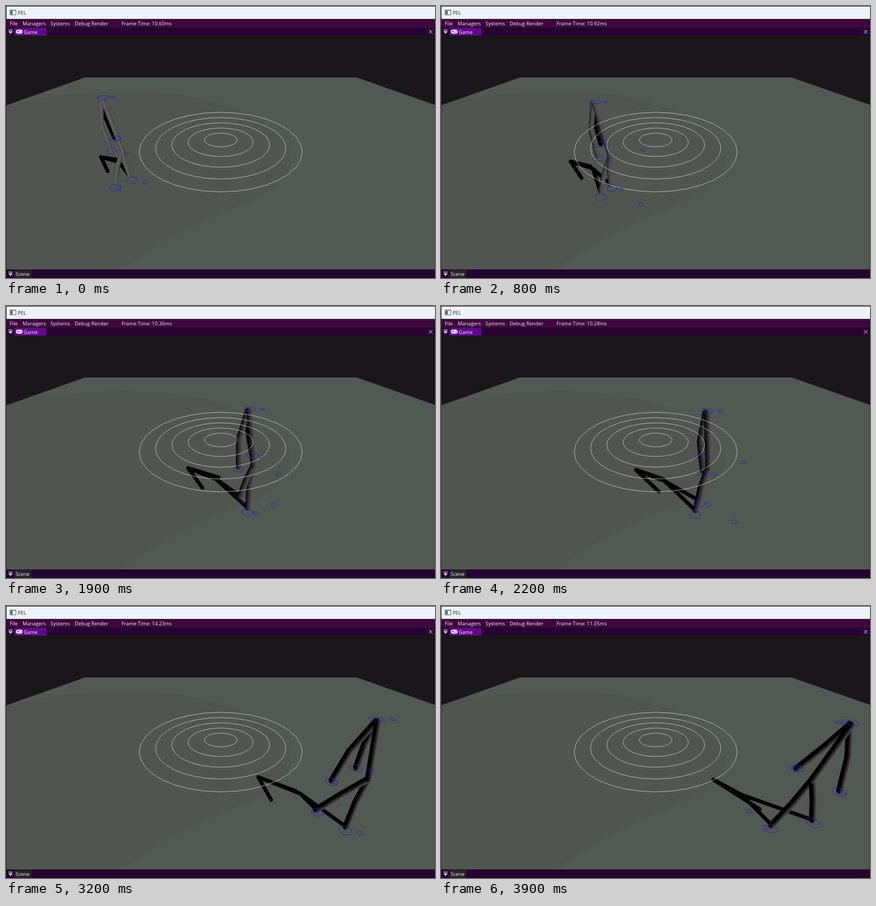
Recreate the animation shown at these times as an HTML page with a canvas. Size 800 by 506 pixels, loop 4000 ms.

```html
<!DOCTYPE html>
<html lang="en">
<head>
<meta charset="utf-8">
<style>
  html, body { margin: 0; width: 100%; height: 100%; overflow: hidden; background: #1a171b; }
  canvas { display: block; }
</style>
</head>
<body>
<canvas id="stage" width="800" height="506"></canvas>
<script>
const ctx = document.getElementById('stage').getContext('2d');
const LOOP = 4000, TICK = 100;
const STRIDE_MS = 695, FOOT_EASE = 236, REACH = 70, LOOK_AHEAD = 600;

// Body path: time, x of the upper end, x of the lower end.
const PATH = [
  [0, 181, 217], [800, 287, 315], [1500, 398, 412], [2200, 496, 497],
  [2600, 566, 561], [3200, 692, 674], [3700, 777, 708], [3900, 764, 690]
];
const UPPER = 1, LOWER = 2;

// phase: first step time; row: screen y at x = 200; side/drift: rest place relative to the body.
const LEGS = [
  { joint: UPPER, phase: 75, row: 246, side: 33, drift: 0.095, bend: -3, ankle: [-1, -2], dark: true },
  { joint: UPPER, phase: 430, row: 270.5, side: 7, drift: 0.04, bend: -8, ankle: [-1, -4] },
  { joint: LOWER, phase: 75, row: 337, side: -4, drift: 0.04, bend: -3, ankle: [0, -8] },
  { joint: LOWER, phase: 424, row: 318, side: 2, drift: 0.1, bend: -2, ankle: [-3, -6] }
];

const mix = (a, b, k) => a + (b - a) * k;
const clamp = (v, lo, hi) => Math.max(lo, Math.min(hi, v));
const gray = v => `rgb(${v},${v},${v})`;

// Continues the first and last stretch beyond the ends of the path.
function bodyX(t, end) {
  let i = 0;
  while (i < PATH.length - 2 && t > PATH[i + 1][0]) i++;
  const a = PATH[i], b = PATH[i + 1];
  return mix(a[end], b[end], (t - a[0]) / (b[0] - a[0]));
}

const onRow = (x, row) => [x, row + (x - 200) * (row * 0.0007 - 0.05)];
const castShadow = (x, dx, row) => [x * 0.74 + dx, row + (x * 0.74 + dx - 200) * 0.175];

function foothold(leg, t) {
  const x = bodyX(t, leg.joint);
  const heading = Math.sign(bodyX(t + LOOK_AHEAD, UPPER) - bodyX(t, UPPER));
  return x + heading * REACH + leg.side - (x - PATH[0][leg.joint]) * leg.drift;
}

// A new foothold every stride; the foot eases towards the latest one.
function walk(leg, t) {
  let step = leg.phase - 2 * STRIDE_MS;
  let target = foothold(leg, step), x = target;
  for (step += STRIDE_MS; step <= t; step += STRIDE_MS) {
    target = foothold(leg, step);
    const moving = Math.min(t - step, STRIDE_MS);
    x = mix(target, x, Math.exp(-moving / FOOT_EASE));
  }
  return { foot: onRow(x, leg.row), target: onRow(target, leg.row) };
}

function rect(color, x, y, w, h) {
  ctx.fillStyle = color;
  ctx.fillRect(x, y, w, h);
}

function polygon(color, ...points) {
  ctx.fillStyle = color;
  ctx.beginPath();
  points.forEach(p => ctx.lineTo(...p));
  ctx.fill();
}

function polyline(color, width, ...points) {
  ctx.strokeStyle = color;
  ctx.lineWidth = width;
  ctx.beginPath();
  points.forEach(p => ctx.lineTo(...p));
  ctx.stroke();
}

function text(str, x, y, size = 9.4, color = '#f4eef5') {
  ctx.font = `${size}px "Open Sans", "Noto Sans", sans-serif`;
  ctx.fillStyle = color;
  ctx.fillText(str, x, y);
}

// Floor-plane circle as the tilted camera sees it.
function marker([x, y], scale = 1) {
  const dx = x - 400;
  const rx = 9 + (dx > 0 ? dx * 0.016 : -dx * 0.006);
  const ry = 3 + (y - 170) * 0.02;
  ctx.strokeStyle = '#2a1fc0';
  ctx.lineWidth = 0.9;
  ctx.beginPath();
  ctx.ellipse(x, y, rx * scale, ry * scale, dx * (y - 130) * 5.5e-6, 0, 7);
  ctx.stroke();
}

// Cylinder: lit on the left, then only a black edge fading into the floor (u = distance walked).
function limb(a, b, u, dark) {
  const dx = b[0] - a[0], dy = b[1] - a[1], len = Math.hypot(dx, dy) || 1;
  const nx = dy / len, ny = -dx / len;
  const width = 9 + Math.max(0, u) * 0.007, shift = (width - 9) / 2;
  const at = k => [(a[0] + b[0]) / 2 + nx * k, (a[1] + b[1]) / 2 + ny * k];
  const fill = ctx.createLinearGradient(...at(shift - width / 2), ...at(shift + width / 2));
  fill.addColorStop(0, gray(dark ? 0 : Math.max(0, 70 - u * 0.4)));
  fill.addColorStop(0.42, gray(dark ? 0 : Math.max(0, 98 - u * 0.21)));
  fill.addColorStop(1, gray(Math.min(82, (dark ? 20 : 68) + u * 0.12)));
  const move = p => [p[0] + nx * shift, p[1] + ny * shift];
  polyline(fill, width, move(a), move(b));
}

function drawFloor() {
  rect('#1a171b', 0, 55, 800, 435);
  polygon('#525852', [0, 185], [147, 133], [654, 133], [800, 184], [800, 490], [0, 490]);
  ctx.fillStyle = '#50564f';
  ctx.beginPath();
  ctx.moveTo(0, 185);
  ctx.bezierCurveTo(160, 145, 350, 150, 450, 200);
  ctx.bezierCurveTo(560, 255, 560, 320, 440, 370);
  ctx.quadraticCurveTo(310, 420, 215, 490);
  ctx.lineTo(0, 490);
  ctx.fill();
}

// Concentric circles on the floor, each a little higher on screen than the next larger one.
function drawRings() {
  for (let ring = 1; ring <= 5; ring++) {
    const rx = 30.4 * ring, ry = 12.2 * ring + 0.52 * ring * ring;
    const cy = 246 + 2.8 * ring + 0.47 * ring * ring;
    const points = Array.from({ length: 33 }, (_, i) => {
      const a = i * Math.PI / 16;
      return [400.4 + rx * Math.cos(a), cy + ry * Math.sin(a)];
    });
    polyline('#d0d4cf', 0.8, ...points);
  }
}

function drawWalker(t) {
  const topX = bodyX(t, UPPER), lowX = bodyX(t, LOWER), u = topX - 181;
  const top = [topX, 170 + u * 0.0807];
  const low = [lowX, 268 + (lowX - 217) * 0.115];
  const hip = [top[0] - 4, top[1] + 3];
  const facing = clamp((bodyX(t + 50, UPPER) - bodyX(t - 50, UPPER)) / 9, -1, 1);

  const legs = LEGS.map(leg => {
    const { foot, target } = walk(leg, t);
    const root = leg.joint === UPPER ? hip : low;
    const end = [foot[0] + leg.ankle[0], foot[1] + leg.ankle[1]];
    const knee = [(root[0] + end[0]) / 2 + leg.bend * facing, (root[1] + end[1]) / 2];
    return { foot, target, root, knee, end, dark: leg.dark };
  });

  const castX = 177 + u * (0.62 - u * 0.00009);
  const shadowTop = [castX, 281 + (castX - 177) * 0.127];
  const shadowLow = castShadow(lowX, 50, 288);
  ctx.lineCap = ctx.lineJoin = 'round';
  polyline('#030403', 7, castShadow(legs[0].foot[0], 57, 284.5), shadowTop,
    castShadow(legs[1].foot[0], 45, 309));
  polyline('#030403', 7, shadowTop, shadowLow, legs[2].end);
  polyline('#030403', 7, shadowLow, legs[3].end);

  for (const { root, knee, end, dark } of legs) {
    limb(root, knee, u, dark);
    limb(knee, end, u, dark);
  }
  limb([top[0] - 1, top[1] + 4], low, u);

  ctx.lineCap = ctx.lineJoin = 'butt';
  drawRings();
  marker(top, 1.12);
  marker([top[0] + facing * (17 + u * 0.025), top[1]], 0.5);
  for (const { foot, target } of legs) {
    marker(foot);
    marker(target, 0.48);
  }
}

function collapseArrow(y) {
  rect('#f4eef5', 4.5, y - 4, 8, 1.2);
  polygon('#f4eef5', [4.5, y - 1], [12.5, y - 1], [8.5, y + 3.5]);
}

function drawGamepad() {
  ctx.fillStyle = '#f4eef5';
  ctx.beginPath();
  ctx.roundRect(18.5, 44, 12.5, 7.5, 3.7);
  ctx.fill();
  rect('#5f0a8c', 20.5, 47.2, 4, 1);
  rect('#5f0a8c', 22, 45.7, 1, 4);
  rect('#5f0a8c', 26, 48.3, 1.4, 1.4);
  rect('#5f0a8c', 28, 46, 1.4, 1.4);
}

// Gentle wave around 10.6 ms, with one hitch that wears off.
function frameTime(t) {
  const sinceHitch = t - 2600;
  const hitch = sinceHitch < 0 ? 0 : 5.49 * Math.exp(-((sinceHitch / 806) ** 2.7));
  return 10.6 + 0.325 * Math.sin(t / LOOP * Math.PI * 8 / 3) + hitch;
}

function drawWindow(t) {
  rect('#252327', 0, 0, 800, 1);
  rect('#edf3f9', 1, 1, 799, 23);
  rect('#59645f', 7, 7, 12, 10);
  rect('#f7f9fa', 8, 8.5, 10, 7.5);
  rect('#3c6b62', 8.5, 9, 4, 6.5);
  text('PEL', 22, 15.5, 9.2, '#202024');

  rect('#3e083f', 0, 24, 800, 16);
  text('File', 7, 36);
  text('Managers', 31, 36);
  text('Systems', 83, 36);
  text('Debug Render', 128, 36);
  text(`Frame Time: ${frameTime(t).toFixed(2)}ms`, 215.5, 36);

  rect('#270131', 0, 40, 800, 15);
  rect('#5f0a8c', 16, 40.5, 59.5, 14.5);
  collapseArrow(48);
  drawGamepad();
  text('Game', 33, 51.5);
  polyline('#e4dce6', 1, [788.5, 44.5], [795.5, 51.5]);
  polyline('#e4dce6', 1, [795.5, 44.5], [788.5, 51.5]);

  rect('#240430', 0, 490, 800, 16);
  rect('#28222b', 15.5, 491, 32, 15);
  collapseArrow(498.5);
  text('Scene', 18, 502);
  rect('#252327', 0, 24, 0.8, 482);
}

function frame() {
  const t = Math.floor(performance.now() % LOOP / TICK) * TICK;
  drawFloor();
  drawWalker(t);
  drawWindow(t);
  requestAnimationFrame(frame);
}
frame();
</script>
</body>
</html>
```
